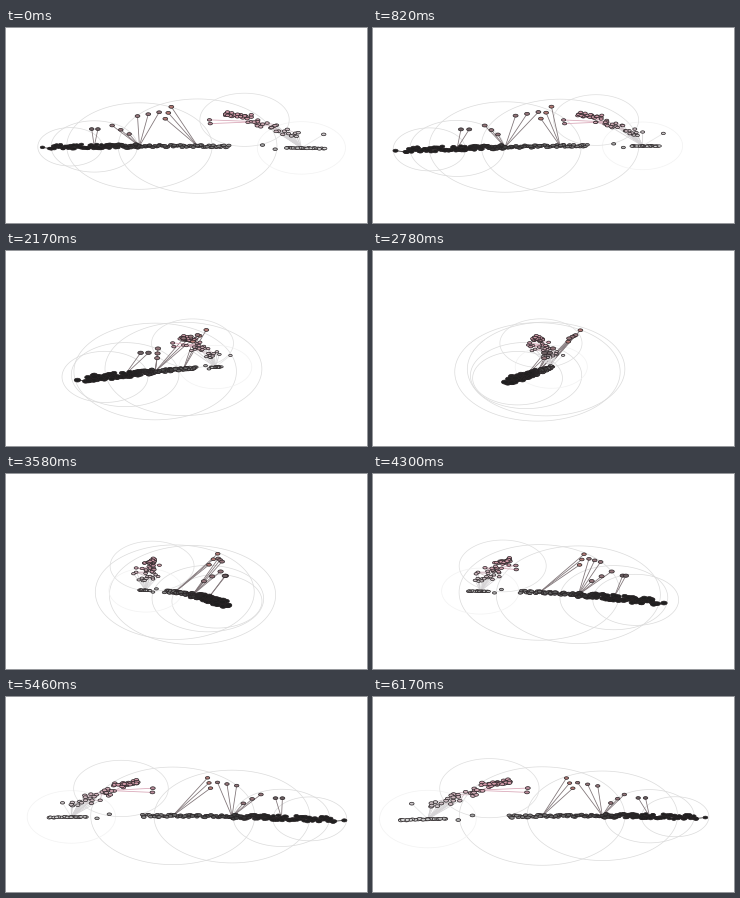
Animation of 361x195 px, one loop 6260 ms. Source, as a matplotlib script:

```python
import numpy as np
import matplotlib.pyplot as plt
from matplotlib.animation import FuncAnimation
from matplotlib.collections import LineCollection, PolyCollection

W, H, DPI = 361, 195, 100
LOOP, TICK, STEPS = 6260, 20, 79
CX, CY, FOCAL, SQUASH = 180.5, 97.5, 440, 0.595
TURN, NEAREST = 2.35, 40.3          # degrees per step, step with the dark tip in front

INK, STEM, MAUVE = (.2, .19, .19), (.5, .46, .47), (.58, .46, .48)
PINK, ROSE, PALE = (.82, .6, .66), (.85, .66, .72), (.8, .78, .79)

rng = np.random.default_rng(7)
points, fills, links, link_colors, halos = [], [], [], [], []


def node(pos, color):
    """pos: along the axis, across it, pixels below eye level."""
    points.append(pos)
    fills.append(color)
    return len(points) - 1


def link(i, j, color):
    links.append((i, j))
    link_colors.append(color)


def mix(c0, c1, t):
    return tuple(np.array(c0) * (1 - t) + np.array(c1) * t)


def spine(a):
    return np.array([a, -.02 + .12 * a - .19 * a * a, 21 - 3 * a + 22 * a * a])


def shade(a):
    return (np.clip(.4 - 1.4 * a, .12, .85),) * 3


def chain(start, end, n, wobble, color):
    """Evenly strewn nodes along the spine, each linked to the next."""
    step = (end - start) / n
    ids = []
    for k in range(n):
        a = start + step * (k + rng.uniform(-.4, .4))
        shake = rng.uniform(-1, 1, 2) * (.006, wobble)
        ids.append(node(spine(a) + (0, *shake), shade(a)))
    for i, j in zip(ids, ids[1:]):
        link(i, j, color)
    return ids


def fan(root, start, end, n, color, line):
    for t in np.linspace(0, 1, n):
        link(root, node(mix(start, end, t), color), line)


def hub(a, radius, grey=.86):
    pos = spine(a)
    halos.append((*pos, radius, grey))
    return node(pos, shade(a))


# spine: dark tip, dense dark part, grey part, pale tail
tip = node(spine(.338), shade(.338))
dark = chain(.319, .11, 90, 2.3, INK)
link(tip, dark[0], INK)
chain(.11, -.1, 54, 1.3, INK)
chain(-.232, -.33, 22, .5, (.5, .5, .5))
for a, drop in ((-.175, -2), (-.205, 2)):
    node(spine(a) + (0, 0, drop), shade(a))

# hubs with their raised fans
hub(.272, 33)
low, mid, high = hub(.215, 44), hub(.11, 74), hub(-.024, 81)
tail = hub(-.268, 46, .95)
fan(low, (.211, .03, 3.5), (.195, .036, 3.5), 2, (.42, .37, .38), STEM)
fan(mid, (.163, .035, 0), (.13, .01, 8.5), 3, MAUVE, STEM)
fan(mid, (.102, .055, -9), (.054, .06, -12.5), 3, MAUVE, STEM)
fan(high, (.027, .066, -17.5), (.043, .042, -6.5), 3, (.7, .48, .46), STEM)

# pink cluster and the arm that falls from it to the tail
halos.append((-.134, -.063, -6, 47, .87))
core = node((-.13, -.065, -8), PINK)
elbow = node((-.165, -.065, -4), PINK)
fan(elbow, (-.05, -.07, -6), (-.052, -.068, -2), 2, (.72, .54, .6), ROSE)
for a in rng.uniform(-.155, -.075, 26):
    d = -10 - 25 * (a + .115) + rng.normal(0, 1.8)
    link(core, node((a, -.066 + rng.normal(0, .012), d), PINK), ROSE)

arm = [core, elbow]
for t in np.linspace(.15, 1, 26):
    pos = np.array([-.12 - .14 * t, -.064, -9 + 19 * t]) + rng.normal(0, 1, 3) * (.01, .015, 2.2)
    cur = node(pos, mix(PINK, PALE, t))
    link(rng.choice(arm[-6:]), cur, mix(ROSE, PALE, t))
    if t > .45:
        link(tail, cur, (.84, .83, .84))
    arm.append(cur)
link(tail, node((-.314, -.04, 9), PALE), (.9, .9, .9))

points, fills = np.array(points), np.array(fills)
links, halos = np.array(links), np.array(halos)


def ring(n):
    t = np.linspace(0, 2 * np.pi, n)
    return np.column_stack([np.cos(t), SQUASH * np.sin(t)])


DOT, HALO = ring(19), ring(121)


def project(p, angle):
    a, b, d = p.T
    s, c = np.sin(angle), np.cos(angle)
    scale = 1 / (1 - a * c + b * s)
    x = CX + FOCAL * (a * s + b * c) * scale
    return np.column_stack([x, CY + d * scale]), scale


def discs(xy, radius, shape):
    return xy[:, None, :] + radius[:, None, None] * shape


px = 72 / DPI
fig = plt.figure(figsize=(W / DPI, H / DPI), dpi=DPI, facecolor="white")
ax = fig.add_axes([0, 0, 1, 1])
ax.set(xlim=(0, W), ylim=(H, 0))
ax.axis("off")

halo_art = LineCollection([], colors=[(g, g, g) for g in halos[:, 4]],
                          linewidths=.7 * px, zorder=1)
link_art = LineCollection([], colors=link_colors, linewidths=.8 * px, zorder=2)
node_art = PolyCollection([], edgecolors=(.16, .14, .15), linewidths=.7 * px, zorder=3)
for art in (halo_art, link_art, node_art):
    ax.add_collection(art, autolim=False)


def draw(i):
    step = min(int(i * TICK * STEPS / LOOP + .2), STEPS - 1)
    angle = np.radians(TURN * (step - NEAREST))

    xy, scale = project(halos[:, :3], angle)
    halo_art.set_segments(discs(xy, halos[:, 3] * scale, HALO))

    xy, scale = project(points, angle)
    link_art.set_segments(xy[links])
    order = np.argsort(scale)           # far nodes first
    node_art.set_verts(discs(xy[order], 2.3 * scale[order], DOT))
    node_art.set_facecolor(fills[order])
    return halo_art, link_art, node_art


anim = FuncAnimation(fig, draw, frames=LOOP // TICK, interval=TICK,
                     repeat=True, repeat_delay=0, blit=False)
plt.show()
```
